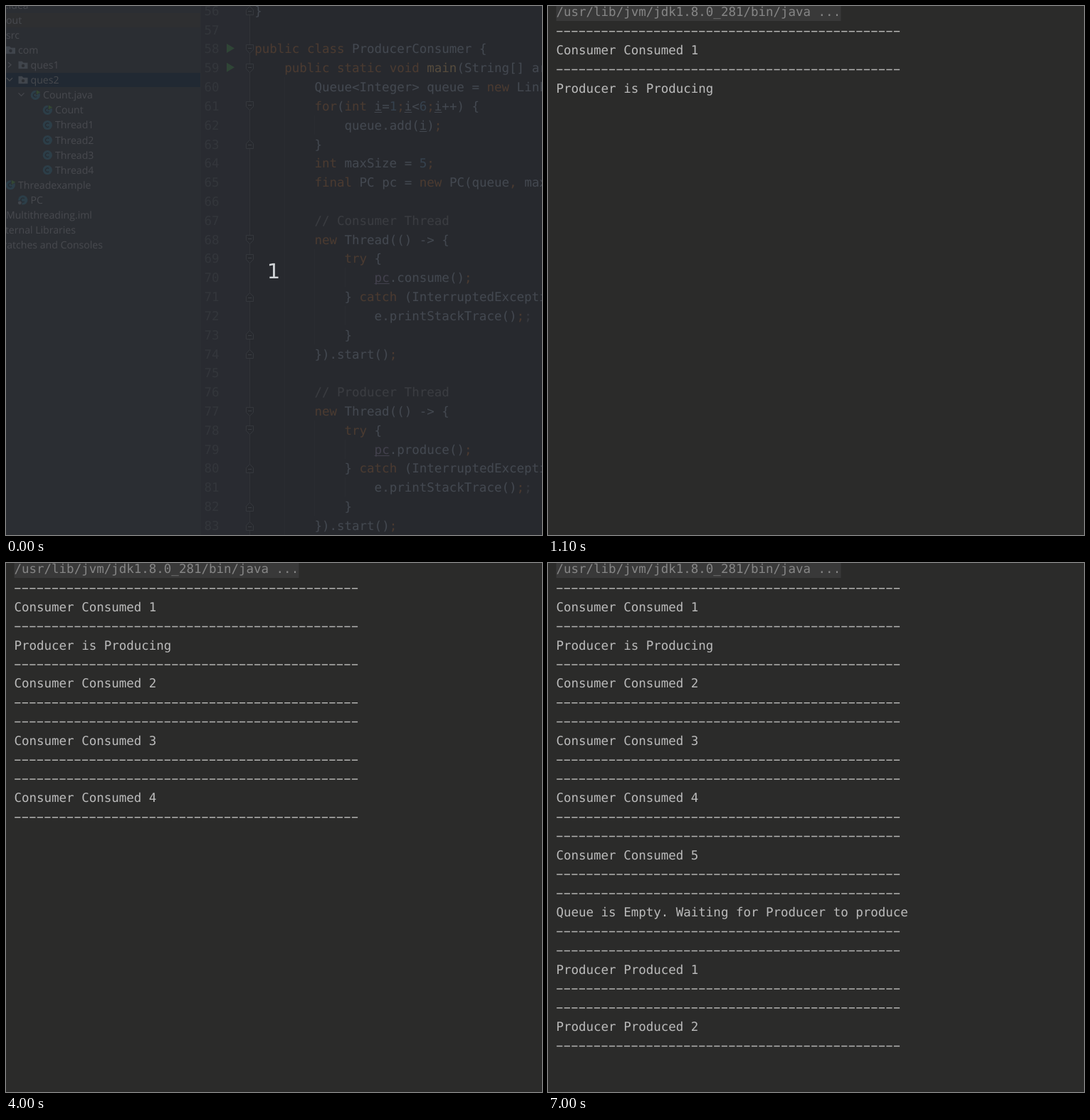
Recreate the animation shown at these times as an HTML page with a canvas. Size 753 px wide and 744 px high, loop 8000 ms.

```html
<!DOCTYPE html>
<html lang="en">
<head>
<meta charset="utf-8">
<title>Producer and consumer demo</title>
<style>
  html, body { margin: 0; width: 100%; height: 100%; overflow: hidden; background: #2b2b2a; }
  canvas { display: block; }
</style>
</head>
<body>
<canvas id="stage" width="753" height="744"></canvas>
<script>
const W = 753, H = 744, LOOP = 8000;
const ctx = document.getElementById('stage').getContext('2d');

const PITCH = 26.82, CELL = 10.526;
const MONO = '17.48px "DejaVu Sans Mono", monospace';
const SANS = '14.1px "Open Sans", "Noto Sans", sans-serif';
const BG = '#2b2b2a', GUTTER = '#313335', SIDE = '#3c3f40';
const PLAIN = '#a9b7c6', KEYWORD = '#cc7832', DIM = '#808080';

function rect(x, y, w, h, color) {
  ctx.fillStyle = color;
  ctx.fillRect(x, y, w, h);
}

function text(str, x, y, color, font, align = 'left') {
  ctx.font = font;
  ctx.textAlign = align;
  ctx.fillStyle = color;
  ctx.fillText(str, x, Math.round(y));
}

function path(points, closed = false) {
  ctx.beginPath();
  points.forEach(([x, y]) => ctx.lineTo(x, y));
  if (closed) ctx.closePath();
}

function stroke(points, color, width = 1, closed = false) {
  path(points, closed);
  ctx.strokeStyle = color;
  ctx.lineWidth = width;
  ctx.stroke();
}

function fill(points, color) {
  path(points, true);
  ctx.fillStyle = color;
  ctx.fill();
}

function disc(x, y, r, color) {
  ctx.beginPath();
  ctx.arc(x, y, r, 0, Math.PI * 2);
  ctx.fillStyle = color;
  ctx.fill();
}

// ---- Project tree ----

const rowY = row => 20 + 21.07 * row;

// [label, x, icon, arrow x]; a negative x aligns the right edge to -x
const TREE = [
  ['out', 0], ['src', 0], ['com', 17, 'folder'],
  ['ques1', 34.5, 'folder', 5], ['ques2', 34.5, 'folder', 5],
  ['Count.java', 52, 'main', 21.5], ['Count', 69, 'main'],
  ['Thread1', 69, 'class'], ['Thread2', 69, 'class'],
  ['Thread3', 69, 'class'], ['Thread4', 69, 'class'],
  ['Threadexample', 17, 'main'], ['PC', 34.5, 'local'],
  ['Multithreading.iml', 0], ['External Libraries', -98],
  ['Scratches and Consoles', -136]
];

function folderIcon(x, y) {
  fill([[x - 6.5, y - 5.5], [x - 1.5, y - 5.5], [x + 0.5, y - 3.5],
        [x + 6.5, y - 3.5], [x + 6.5, y + 5], [x - 6.5, y + 5]], '#9aa7b0');
  disc(x, y + 0.8, 2.2, SIDE);
}

function classIcon(x, y, kind) {
  disc(x, y, 6.6, '#3f88a2');
  ctx.beginPath();
  ctx.arc(x, y, 2.8, 0.8, Math.PI * 2 - 0.8);
  ctx.strokeStyle = '#26383f';
  ctx.lineWidth = 1.3;
  ctx.stroke();
  if (kind === 'main') {
    fill([[x + 0.5, y - 8], [x + 8, y - 4], [x + 0.5, y + 0.5]], SIDE);
    fill([[x + 1.5, y - 7], [x + 7, y - 4], [x + 1.5, y - 0.8]], '#62b543');
  } else if (kind === 'local') {
    disc(x - 4.5, y + 4, 3.4, SIDE);
    disc(x - 4.5, y + 4, 2.4, '#9aa7b0');
  }
}

function drawTree() {
  rect(0, 0, 274, H, SIDE);
  rect(0, 10, 273, 20, '#4b4639');
  rect(0, 94, 273, 20, '#0d293e');
  text('.idea', 0, 4, '#bbbbbb', SANS);
  TREE.forEach(([label, x, icon, arrow], i) => {
    const y = rowY(i);
    text(label, Math.abs(x), y + 5, '#bbbbbb', SANS, x < 0 ? 'right' : 'left');
    if (icon === 'folder') folderIcon(x - 10.5, y);
    else if (icon) classIcon(x - 10.7, y, icon);
    if (!arrow) return;
    stroke(label === 'ques1'
      ? [[arrow - 2, y - 4], [arrow + 2, y - 0.5], [arrow - 2, y + 3]]
      : [[arrow - 4, y - 3], [arrow, y + 1], [arrow + 4, y - 3]], '#adadad', 1.3);
  });
}

// ---- Code editor ----

const FIRST = 56, CODE_X = 349.2;
const CODE = `}

public class ProducerConsumer {
    public static void main(String[] args) throws InterruptedException {
        Queue<Integer> queue = new LinkedList<>();
        for(int i=1;i<6;i++) {
            queue.add(i);
        }
        int maxSize = 5;
        final PC pc = new PC(queue, maxSize);

        // Consumer Thread
        new Thread(() -> {
            try {
                pc.consume();
            } catch (InterruptedException e) {
                e.printStackTrace();;
            }
        }).start();

        // Producer Thread
        new Thread(() -> {
            try {
                pc.produce();
            } catch (InterruptedException e) {
                e.printStackTrace();;
            }
        }).start();`.split('\n');

const TOKENS = new RegExp([
  '(?<comment>//.*)',
  '(?<keyword>\\b(?:public|class|static|void|throws|new|for|int|final|try|catch)\\b|(?<!;);|,)',
  '(?<extra>;)',
  '(?<number>\\b\\d+\\b)',
  '(?<method>\\bmain\\b)',
  '(?<changed>\\bi\\b)',
  '(?<captured>\\bpc(?=\\.))',
  '\\w+|[^\\w\\s]'
].join('|'), 'g');

const COLORS = {
  comment: DIM, keyword: KEYWORD, extra: '#72737a', number: '#6897bb',
  method: '#ffc66d', changed: PLAIN, captured: '#a594b5'
};

const FOLD_OPEN = [58, 59, 61, 68, 69, 77, 78];
const FOLD_CLOSE = [56, 63, 71, 73, 74, 80, 82, 83];
// [column, first line, last line]
const GUIDES = [[4, 60, 84], [8, 62, 62], [8, 69, 73], [8, 78, 82],
                [12, 70, 70], [12, 72, 72], [12, 79, 79], [12, 81, 81]];

const lineY = n => 60 + (n - 58) * PITCH;

function drawCodeLine(line, n) {
  const base = lineY(n) + 6.4;
  for (const m of line.matchAll(TOKENS)) {
    const kind = Object.keys(COLORS).find(k => m.groups[k]);
    const color = COLORS[kind] || PLAIN;
    const x = CODE_X + m.index * CELL;
    text(m[0], x, base, color, MONO);
    if (kind === 'changed' || kind === 'captured')
      rect(x, Math.round(base) + 2, m[0].length * CELL, 1, color);
  }
}

function drawFold(n, dir) {
  const x = 342.5, y = Math.round(lineY(n)) + 0.5;
  const shape = [[-5, -6], [5, -6], [5, 1], [0, 6], [-5, 1]]
    .map(([dx, dy]) => [x + dx, y + dy * dir]);
  fill(shape, BG);
  stroke(shape, '#6a6c6d', 1, true);
  stroke([[x - 2.5, y - dir], [x + 2.5, y - dir]], '#85888a');
}

function drawEditor() {
  rect(274, 0, W - 274, H, BG);
  rect(274, 0, 69, H, GUTTER);
  for (const [col, from, to] of GUIDES) {
    const top = Math.round(lineY(from) - PITCH / 2);
    rect(Math.round(CODE_X + col * CELL), top, 1, Math.round((to - from + 1) * PITCH), '#383838');
  }
  rect(342, 0, 1, H, '#555555');
  CODE.forEach((line, i) => {
    const n = FIRST + i;
    text(String(n), 278.4, lineY(n) + 6.4, '#606366', MONO);
    drawCodeLine(line, n);
  });
  for (const n of [58, 59]) {
    const y = lineY(n) - 0.5;
    fill([[310, y - 6.5], [321, y], [310, y + 6.5]], '#4fa84f');
  }
  FOLD_OPEN.forEach(n => drawFold(n, 1));
  FOLD_CLOSE.forEach(n => drawFold(n, -1));
}

function drawIde() {
  drawTree();
  drawEditor();
}

function drawCountdown() {
  drawIde();
  rect(0, 0, W, H, 'rgba(39, 42, 48, 0.78)');
  text('1', 376, 383, '#d0d3d6', '29px "DejaVu Sans", sans-serif', 'center');
}

// ---- Console ----

const RULE = null;
const boxed = str => [RULE, str, RULE];

// [time, lines printed at that time]
const OUTPUT = [
  [1100, [...boxed('Consumer Consumed 1'), 'Producer is Producing']],
  [2000, boxed('Consumer Consumed 2')],
  [3000, boxed('Consumer Consumed 3')],
  [4000, boxed('Consumer Consumed 4')],
  [5000, boxed('Consumer Consumed 5')],
  [6000, [...boxed('Queue is Empty. Waiting for Producer to produce'),
          ...boxed('Producer Produced 1')]],
  [7000, boxed('Producer Produced 2')]
];

function drawRule(y) {
  const gap = 2.3;
  ctx.setLineDash([CELL - gap, gap]);
  stroke([[12.2, y], [11.5 + 46 * CELL, y]], '#b4b4b2', 1.5);
  ctx.setLineDash([]);
}

function drawConsole(t) {
  const x = 11.5;
  rect(0, 0, W, H, BG);
  rect(x, 0, 38 * CELL, 21, '#393939');
  text('/usr/lib/jvm/jdk1.8.0_281/bin/java ...', x, 14.3, '#868686', MONO);
  const lines = OUTPUT.filter(([at]) => t >= at).flatMap(([, part]) => part);
  lines.forEach((line, i) => {
    const y = (i + 1) * PITCH;
    if (line === RULE) drawRule(9 + y);
    else text(line, x, 14.3 + y, '#bbbbbb', MONO);
  });
}

function draw(now) {
  const t = now % LOOP;
  ctx.textRendering = 'geometricPrecision';
  if (t < 100) drawCountdown();
  else if (t < 700) drawIde();
  else drawConsole(t);
}

function tick(now) {
  draw(now);
  requestAnimationFrame(tick);
}

draw(0);
requestAnimationFrame(tick);
</script>
</body>
</html>
```
